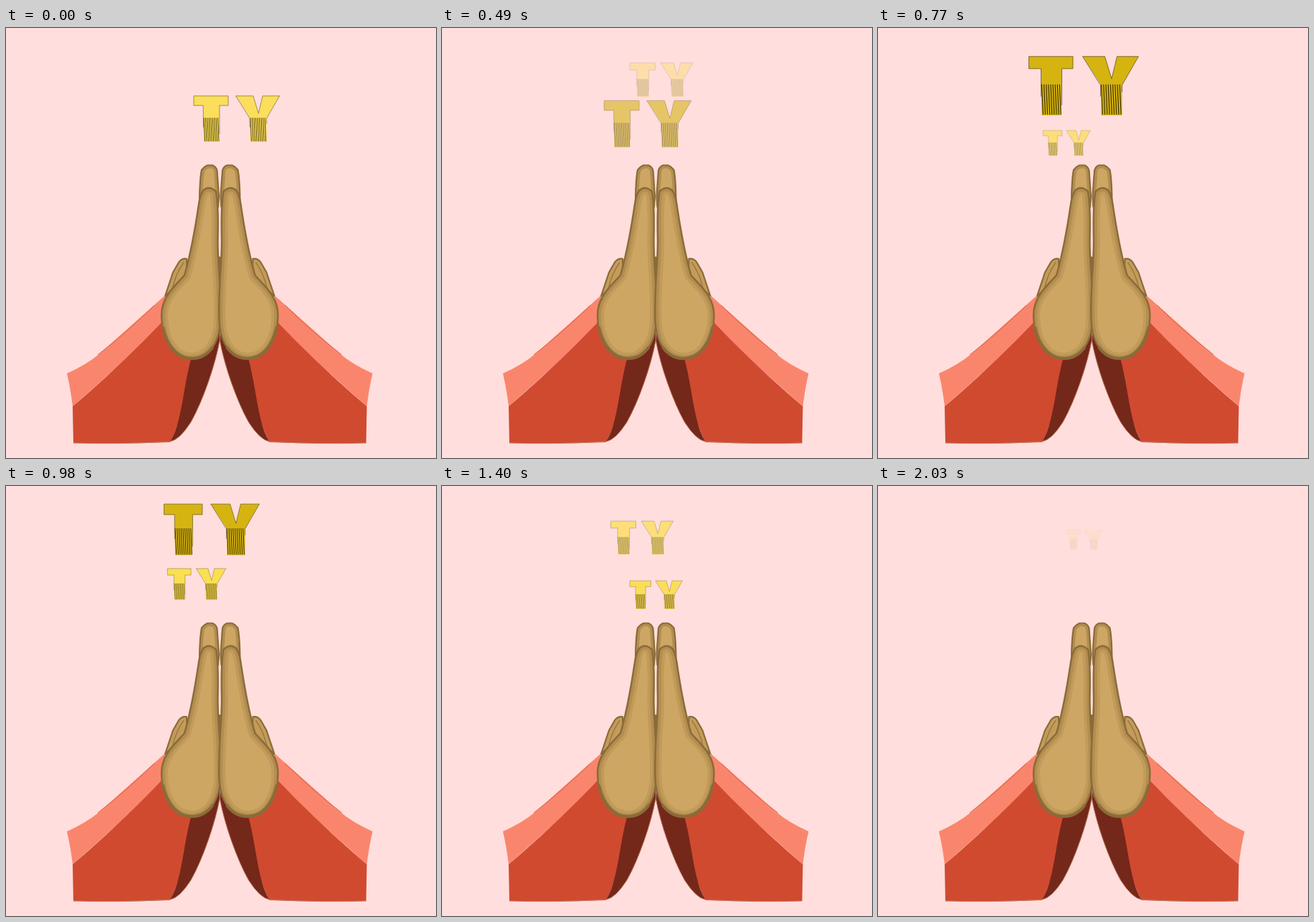
An HTML page that plays this animation: 600x600 px, repeating every 2.1 s.

```html
<!DOCTYPE html>
<html lang="en">
<head>
<meta charset="utf-8">
<title>TY</title>
<style>
  html, body { margin: 0; width: 100%; height: 100%; overflow: hidden; background: #ffdedd; }
  svg { display: block; width: 100vw; height: 100vh; }
</style>
</head>
<body>
<svg viewBox="0 0 600 600" role="img" aria-label="TY rising above praying hands">
  <defs>
    <path id="palm" d="M275 227Q283 219 293 228C296 245 296 270 295.500 292C295 315 297 335 298 352C299 375 300 400 298.500 415C296 442 281 462 259 462C232 462 217 434 217 401C217 375 235 361 249 345C257 318 264 280 269 246Q271 233 275 227Z"/>
    <path id="finger" d="M270 250C270 225 271 208 273 198Q277 193 281 191.500H288Q293 193 294.500 199L297 235L296 250Z"/>
    <path id="thumb" d="M252 322Q245 321 241 327L233 341L222 374L253 346Z"/>
    <clipPath id="palmClip"><use href="#palm"/></clipPath>
    <clipPath id="fingerClip"><use href="#finger"/></clipPath>
    <g id="arm">
      <path fill="#f9866c" d="M85 482Q112 470 130 455L222 373V413L93 528Q90 503 85 482Z"/>
      <path fill="none" stroke="#d95d44" d="M128 456Q166 427 207 387"/>
      <path fill="#d04a30" d="M93 528Q160 471 218 410L263 455Q252 490 248 520Q242 553 229 578Q160 581 94 579Z"/>
      <path fill="#74281a" d="M260 455L285 445L298 422V437C292 470 275 520 258 550Q242 575 229 577C246 551 247 498 260 455Z"/>
      <path fill="none" stroke="#b9785c" d="M298 437C292 470 275 520 258 550Q242 575 229 577Q160 581 94 579"/>
      <g stroke="#8a6b39" stroke-linejoin="round">
        <use href="#thumb" fill="#c49c5a" stroke-width="2.200"/>
        <path fill="none" stroke="#9c7945" stroke-width="1.500" d="M248 327Q236 344 232 365"/>
        <use href="#finger" fill="#cda664"/>
        <use href="#finger" fill="none" stroke="#b38e50" stroke-width="9" clip-path="url(#fingerClip)"/>
        <use href="#finger" fill="none" stroke-width="2.200"/>
        <use href="#palm" fill="#cda664"/>
        <g fill="none" clip-path="url(#palmClip)">
          <use href="#palm" stroke="#c29b5a" stroke-width="18"/>
          <use href="#palm" stroke="#b38e50" stroke-width="10"/>
        </g>
        <use href="#palm" fill="none" stroke-width="2.500"/>
        <path fill="none" stroke-width="4" stroke-linecap="round" d="M219 418C225 445 240 461 259 461Q277 461 288 446"/>
      </g>
    </g>
  </defs>
  <rect width="600" height="600" fill="#ffdedd"/>
  <path fill="#8a6b39" d="M294 319H302L300 360H297Z"/>
  <use href="#arm"/>
  <use href="#arm" transform="translate(596.500) scale(-1 1)"/>
  <g id="words"></g>
</svg>
<script>
const NS = "http://www.w3.org/2000/svg";
const STEP = 70, STEPS = 30;
const WIDTH = 153, HEIGHT = 82;
const GROWTH = 8.6, FADE = 6.2;
const layer = document.getElementById("words");

// Steps: peak = widest, mid = most opaque, end = highest.
// x is the anchor; align places it between the left edge (0) and the right edge (1).
const words = [
  { fill: "#fbdf5c", size: 128, peak: 2.2, mid: 1.5, end: 7.6, top: 72, x: 262 },
  { fill: "#d5b410", size: 153, peak: 10.9, mid: 12, end: 16, top: 57, x: 287, align: .5 },
  { fill: "#fbe052", size: 89, peak: 18, mid: 15.5, end: 23, top: -16, x: 263, align: .5,
    spread: 1.6, rise: 51, power: .5, drift: .14 },
  { fill: "#fbdf50", size: 88, peak: 23.5, mid: 23, end: 29, top: 75, x: 262 }
];

function pose({ size, peak, mid, end, top, x, align = 0, spread = 1, rise = .95, power = 2, drift = 0 }, step) {
  const width = size * Math.max(0, 1 - ((step - peak) / (GROWTH * spread)) ** 2);
  const centerY = top + rise * Math.max(0, end - step) ** power;
  const age = step - mid + FADE;
  return {
    scale: width / WIDTH,
    left: x + drift * age ** 2 - align * width,
    top: centerY - width / WIDTH * HEIGHT / 2,
    opacity: Math.max(0, 1 - ((step - mid) / FADE) ** 4)
  };
}

function add(parent, name, attrs) {
  const node = document.createElementNS(NS, name);
  for (const key in attrs) node.setAttribute(key, attrs[key]);
  return parent.appendChild(node);
}

function fringe(left, right, count = 9) {
  const gap = (right - left) / count;
  return Array.from({ length: count }, (_, i) =>
    `M${left + gap * i} 39l${gap * .6} 42`).join("");
}

function makeWord({ fill }) {
  const group = add(layer, "g", {});
  const line = { fill: "none", stroke: "#3b2d00" };
  add(group, "path", {
    fill,
    d: "M0 0H61.500V17H46V39L45 82H18L17 39V17H0Z" +
       "M75 0H106L115.500 31L123 0H153L130 40V82H101V40Z"
  });
  add(group, "path", {
    ...line, "stroke-width": .8, "stroke-opacity": .75,
    d: "M17 56V17H0V0H61.500V17H46V68M100 56V40L75 0H106L115.500 31L123 0H153L130 40V50"
  });
  add(group, "path", { ...line, "stroke-width": 1.1, d: fringe(18, 46) + fringe(101, 130) });
  return group;
}

const groups = words.map(makeWord);

function draw(time) {
  const step = Math.floor(time / STEP) % STEPS;
  words.forEach((word, i) => {
    const { left, top, scale, opacity } = pose(word, step);
    groups[i].setAttribute("opacity", opacity);
    groups[i].setAttribute("transform", `translate(${left} ${top}) scale(${scale})`);
  });
}

const start = performance.now();
function tick() {
  draw(performance.now() - start);
  requestAnimationFrame(tick);
}
tick();
</script>
</body>
</html>
```
